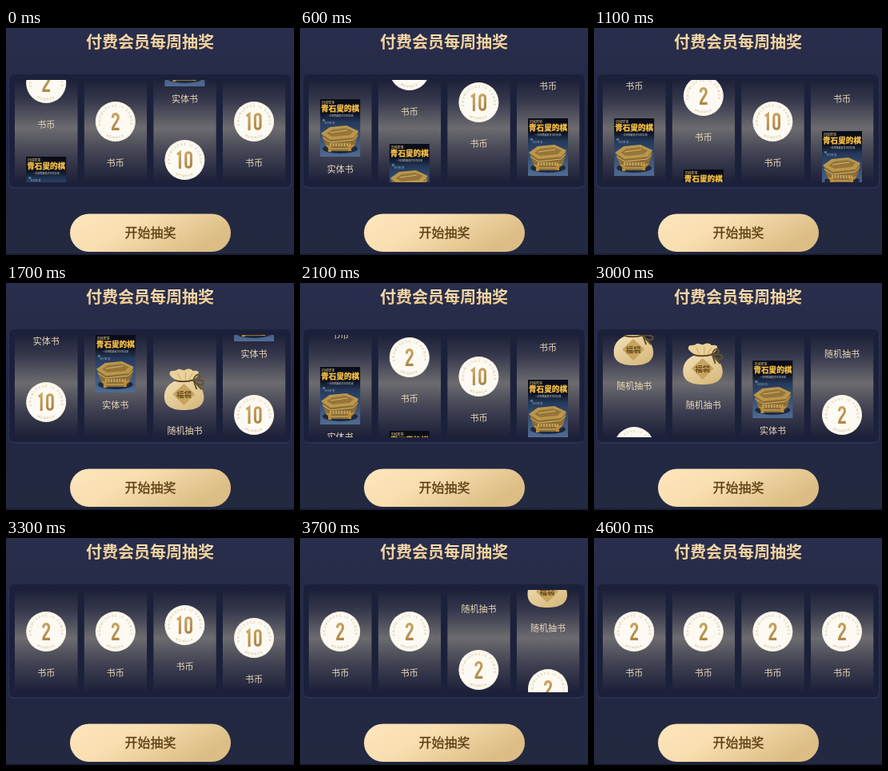
An HTML page for the animation above (4700 ms loop, 360x284 px).

```html
<!DOCTYPE html>
<html lang="zh">
<head>
<meta charset="utf-8">
<title>抽奖</title>
<style>
html, body { margin: 0; width: 100%; height: 100%; overflow: hidden; background: #222843; }
svg { display: block; }
text { font-family: "Noto Sans CJK SC", "Noto Sans CJK", "Noto Sans", sans-serif; text-anchor: middle; }
.label { font-size: 11px; fill: #ead9ba; }
.ring { font: 4px Inter, sans-serif; letter-spacing: 1.2px; fill: #cbb888; }
.digit { fill: none; stroke: url(#gold); stroke-width: 3.1; }
</style>
</head>
<body>
<svg id="stage" width="360" height="284" viewBox="0 0 360 284">
  <defs>
    <linearGradient id="sky" x2="0" y2="1">
      <stop stop-color="#282e4b"/><stop offset=".5" stop-color="#212743"/><stop offset="1" stop-color="#232940"/>
    </linearGradient>
    <linearGradient id="slot" x2="0" y2="1">
      <stop stop-color="#1d2139"/><stop offset=".2" stop-color="#36384c"/>
      <stop offset=".47" stop-color="#6c6b6f"/><stop offset=".75" stop-color="#3c3d4f"/>
      <stop offset="1" stop-color="#1c2038"/>
    </linearGradient>
    <linearGradient id="button" x2="1" y2=".4">
      <stop stop-color="#fee6bd"/><stop offset=".45" stop-color="#f8deaf"/><stop offset="1" stop-color="#dcbd85"/>
    </linearGradient>
    <linearGradient id="titleGold" x2="0" y2="1">
      <stop stop-color="#fbe3bb"/><stop offset="1" stop-color="#edc587"/>
    </linearGradient>
    <linearGradient id="gold" gradientUnits="userSpaceOnUse" x1="-6" y1="-11" x2="6" y2="11">
      <stop stop-color="#cfaa66"/><stop offset="1" stop-color="#a98143"/>
    </linearGradient>
    <linearGradient id="cloth" x2=".8" y2="1">
      <stop stop-color="#f3e0b6"/><stop offset="1" stop-color="#d6b97d"/>
    </linearGradient>
    <linearGradient id="cover" x2="0" y2="1">
      <stop offset=".22" stop-color="#0a0d18"/><stop offset=".4" stop-color="#243a5c"/><stop offset="1" stop-color="#506b92"/>
    </linearGradient>
    <path id="top" d="M0 18.5A18.5 18.5 0 1 1 .01 18.5"/>
    <path id="bottom" d="M-21.5 0A21.5 21.5 0 0 0 21.5 0"/>

    <g id="coin">
      <circle r="25" fill="#fdfaf3"/>
      <circle r="24.2" fill="none" stroke="#f1e8d4" stroke-width=".7"/>
      <text class="ring"><textPath href="#top" startOffset="50%">KNOWLEDGE IS POWER</textPath></text>
      <text class="ring"><textPath href="#bottom" startOffset="50%">MEMBER</textPath></text>
    </g>
    <g id="two">
      <use href="#coin" y="52"/>
      <path class="digit" transform="translate(0 52)" d="M-3.4-4.5V-6A3.4 3.4 0 0 1 3.4-6V-4.5C3.4-1-3.4 5-3.4 9.4H4.8"/>
      <text class="label" y="107.6">书币</text>
    </g>
    <g id="ten">
      <use href="#coin" y="52"/>
      <path class="digit" transform="translate(0 52)" d="M-9.4-6.8L-6-9.4V11M1.4-6A3.3 3.3 0 0 1 8-6V6A3.3 3.3 0 0 1 1.4 6Z"/>
      <text class="label" y="107.6">书币</text>
    </g>
    <g id="book">
      <g transform="translate(-25 16)">
        <rect width="50" height="72" fill="url(#cover)"/>
        <text x="10" y="5.6" font-size="4" fill="#e5cf8d">旧城密事</text>
        <text x="25" y="15.2" font-size="9.6" font-weight="900" fill="#f2bd45" stroke="#f2bd45" stroke-width=".4">青石叟的棋</text>
        <text x="25" y="21.5" font-size="3" fill="#c9ccd2">一局残棋藏着百年的旧事</text>
        <circle cx="4.5" cy="26.5" r="1.7" fill="#5e7591"/>
        <text x="12" y="31" font-size="3" fill="#8fa0b5">林间客 著</text>
        <ellipse cx="25" cy="62" rx="22" ry="6" fill="#1d2a40"/>
        <path d="M2 43L7 59 14 65H35L43 59 48 42Z" fill="#8c6d36"/>
        <path d="M1 43L12 35 33 33 48 40 42 48 13 51Z" fill="#bb974c"/>
        <path d="M8 43L15 38 32 36 42 40 37 45 15 47Z" fill="#96753a"/>
        <path d="M3 48L13 54 41 51 47 45M8 58L14 62H35L42 57M13 42L34 39" fill="none" stroke="#d5b66b"/>
        <path d="M10 58h4v8h-4ZM35 57h4v8h-4Z" fill="#b88c3c"/>
        <path d="M12 57H38" stroke="#c9a558" stroke-width="4" stroke-dasharray="2 1.5"/>
      </g>
      <text class="label" y="107.6">实体书</text>
    </g>
    <g id="bag">
      <path d="M-10 41C-19 44-26 51-25.5 62C-25 74-15 78-1 78C14 78 23.5 74 24 62C24 52 17 44 8 41Z" fill="url(#cloth)"/>
      <path d="M-9 42C-14 38-19 36-19 32C-18 27-13 30-10 28C-6 25-3 29 0 28C4 26 8 26 10 29C14 28 19 29 17 33C16 37 12 39 8 42Z" fill="#ead19a"/>
      <path d="M-9 32L-5 40M1 31V40M10 32L5 40" stroke="#c5a25f" fill="none"/>
      <path d="M-1 45L13 58-1 72-15 58Z" fill="#c7a45f"/>
      <path d="M-12 41Q0 44 12 40" fill="none" stroke="#5f4825" stroke-width="2"/>
      <path d="M11 41C12 34 17 32 19 35C20 39 15 41 11 41C18 39 25 41 23 45C20 48 14 45 11 41L15 52M11 41L21 52" fill="none" stroke="#65502b" stroke-width="2"/>
      <text x="-1" y="61.5" font-size="9.5" font-weight="700" fill="#684a1b">福袋</text>
      <text class="label" y="107.6">随机抽书</text>
    </g>
  </defs>

  <rect width="360" height="284" fill="url(#sky)"/>
  <rect y="282" width="360" height="2" fill="#1b1f35"/>
  <text x="180" y="25" font-size="20" font-weight="900" fill="url(#titleGold)">付费会员每周抽奖</text>
  <rect x="3" y="58" width="354" height="143" rx="7" fill="#293151"/>
  <rect x="4" y="58" width="352" height="141" rx="6" fill="#1c213b"/>
  <g id="reels"></g>
  <rect x="80" y="232.5" width="201" height="47.5" rx="23.7" fill="url(#button)"/>
  <text x="180.5" y="262" font-size="16" font-weight="500" fill="#5b3c12" stroke="#5b3c12" stroke-width=".3">开始抽奖</text>
</svg>
<script>
const LOOP = 4700, STEP = 100, ITEM = 128, STRIP = 4 * ITEM;
const items = ["two", "book", "ten", "bag"];

// Per reel: [time in ms, distance left to the winning item]
const tracks = [
  [[0, 3024], [1100, 1952], [1700, 1312], [2500, 528], [2917, 128], [3183, 0]],
  [[0, 3072], [1100, 2016], [1700, 1392], [2500, 608], [3000, 112], [3233, 0]],
  [[0, 3376], [1100, 2304], [1700, 1680], [2500, 880], [3000, 400], [3700, 48], [3800, 0]],
  [[0, 3328], [240, 3328], [1100, 2480], [1700, 1840], [2500, 1056], [3000, 560], [3310, 256], [3700, 72], [3850, 0]]
];

function add(parent, tag, attrs) {
  const el = document.createElementNS("http://www.w3.org/2000/svg", tag);
  for (const key in attrs) el.setAttribute(key, attrs[key]);
  return parent.appendChild(el);
}

const reels = tracks.map((_, i) => {
  const slot = add(document.getElementById("reels"), "svg", { x: 11 + 86.6 * i, y: 65, width: 78.5, height: ITEM });
  add(slot, "rect", { width: 79, height: ITEM, fill: "url(#slot)" });
  return items.map(id => add(slot, "use", { href: "#" + id, x: 39.2 }));
});

function distance(track, t) {
  const next = track.findIndex(([time]) => time > t);
  if (next < 0) return 0;
  const [t0, d0] = track[next - 1], [t1, d1] = track[next];
  return Math.round((d0 + (d1 - d0) * (t - t0) / (t1 - t0)) / 8) * 8;
}

function draw() {
  const t = Math.floor(performance.now() % LOOP / STEP) * STEP;
  reels.forEach((reel, i) => {
    const d = distance(tracks[i], t);
    reel.forEach((item, k) => {
      const y = (k * ITEM + d) % STRIP;
      item.setAttribute("y", y < ITEM ? y : y - STRIP);
    });
  });
  requestAnimationFrame(draw);
}
draw();
</script>
</body>
</html>
```
